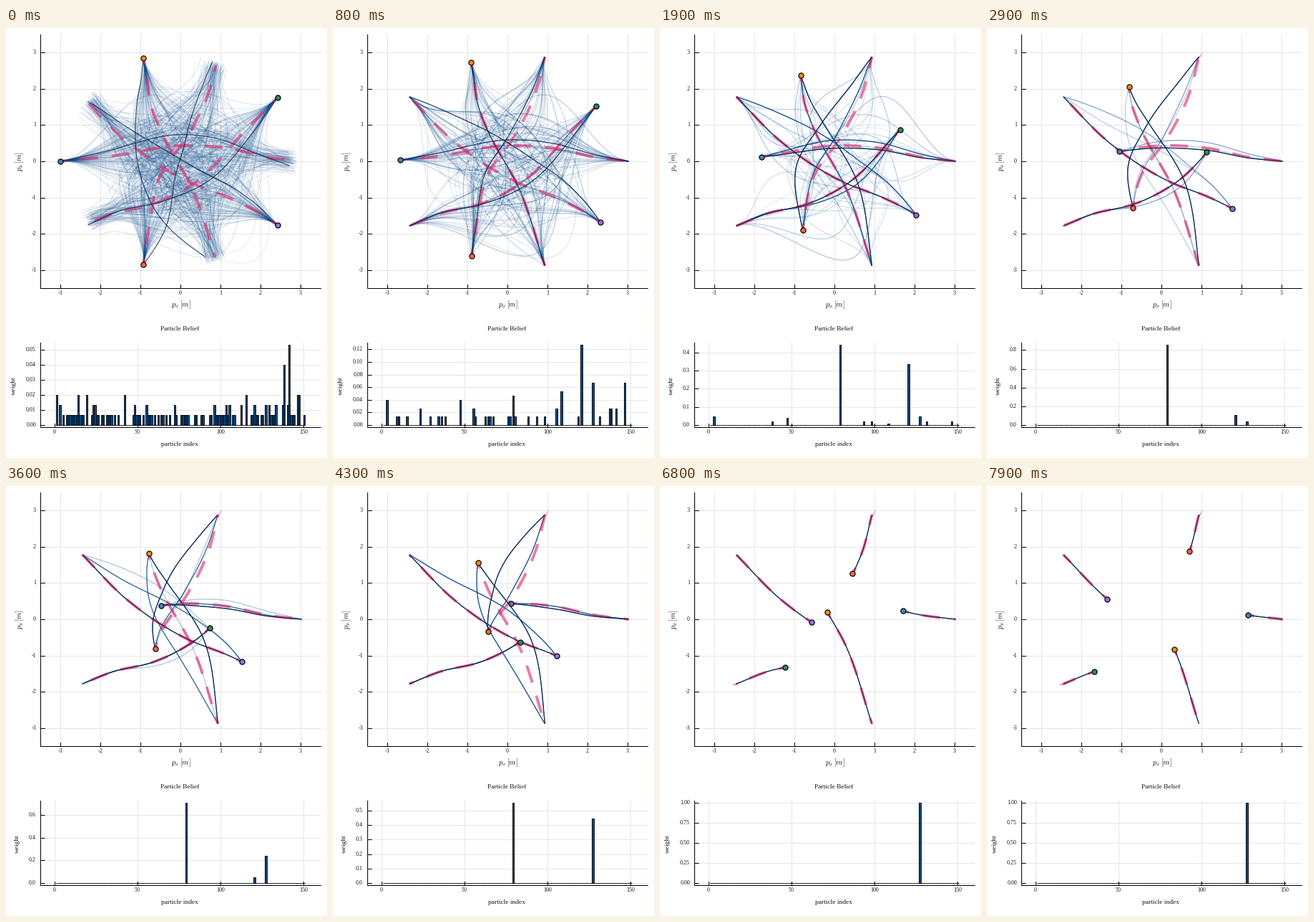
Write a matplotlib script that moves like this. It is 449 px wide and 600 px high and loops after 8000 ms.

```python
import numpy as np
import matplotlib.pyplot as plt
from matplotlib.animation import FuncAnimation
from matplotlib.collections import LineCollection, PolyCollection
from matplotlib.colors import to_rgb
from matplotlib.patches import Polygon

W, H, DPI = 449, 600, 64
FRAMES, INTERVAL = 80, 100
N = 150
PT = 72 / DPI  # points per pixel
NAVY, PINK = "#0a4a8c", (0.86, 0.15, 0.42, 0.6)

plt.rcParams.update({"font.family": "Liberation Serif", "mathtext.fontset": "cm"})


def polar(deg, r):
    """Pixel position of a point given in polar plot coordinates."""
    a = np.radians(deg)
    return np.array([244 + 56 * r * np.cos(a), 186 - 50.6 * r * np.sin(a)])


def spline(x, y, q, rest=False):
    """Cubic Hermite curve through (x, y); rest starts it with zero slope."""
    m = np.gradient(y, x)
    if rest:
        m[0] = 0
    k = np.clip(np.searchsorted(x, q, "right") - 1, 0, len(x) - 2)
    h = x[k + 1] - x[k]
    u = (q - x[k]) / h
    return ((1 + 2 * u) * (1 - u) ** 2 * y[k] + u * (1 - u) ** 2 * h * m[k]
            + u * u * (3 - 2 * u) * y[k + 1] + u * u * (u - 1) * h * m[k + 1])


def bends(s):
    """Two plain sines, then two bumps that leave and arrive smoothly."""
    p = np.pi * s
    bump = np.sin(p) ** 2
    return np.array([np.sin(p), np.sin(2 * p), bump, bump * np.cos(p)])


class Agent:
    """Crosses the circle; its route is a sideways offset from the diameter."""
    times = np.array([0, 19, 43, 58, 79, 105], float)

    def __init__(self, color, angle, *stops):
        self.color = color
        self.start = polar(angle, 3)
        goal = polar(angle + 180, 3.03)
        d = goal - self.start
        self.length = np.hypot(*d)
        self.e = d / self.length
        self.n = np.array([-self.e[1], self.e[0]])
        self.a, self.b = self.project([self.start, *stops, goal])

    def project(self, pts):
        p = np.array(pts, float) - self.start
        return p @ self.e, p @ self.n

    def place(self, a, b):
        return self.start + a[..., None] * self.e + b[..., None] * self.n

    def side(self, a):
        return spline(self.a, self.b, a)

    def progress(self, t):
        return spline(self.times, self.a, t, rest=True)

    def fit(self, t, pts):
        """Sine weights of a detour through pts, planned at time t."""
        a, b = self.project(pts)
        a0 = self.progress(t)
        s = (a - a0) / (self.length - a0)
        return np.linalg.lstsq(bends(s)[:2].T, b - self.side(a), rcond=None)[0]


AGENTS = [
    Agent("steelblue", 180, (142, 179.5), (248.5, 164), (310.5, 168), (365, 180)),
    Agent("seagreen", 36, (336, 141.5), (261.5, 217.5), (205, 246), (150, 259)),
    Agent("darkorange", 108, (196.5, 66), (202.5, 106.5), (213, 135.5), (262, 227.5)),
    Agent("tomato", 252, (199.5, 282), (217, 203), (252, 153.5), (283, 91.5)),
    Agent("mediumpurple", 324, (358, 260.5), (312.5, 237), (255.5, 214.5), (168, 157.5)),
]
BLUE, GREEN, ORANGE, RED, PURPLE = range(5)

# Strong particles: index -> (time planned, key points of each detour)
LATE = 127
DETOURS = {
    79: (29, {BLUE: [(290, 169)],
              ORANGE: [(247, 163), (284, 240)],
              RED: [(207, 165), (262, 83)]}),
    120: (29, {BLUE: [(280, 157), (360, 174)],
               GREEN: [(245, 237), (160, 256)],
               ORANGE: [],
               RED: [(215, 205), (268, 108)],
               PURPLE: [(280, 190), (190, 128)]}),
    LATE: (43, {ORANGE: [(213, 190), (262, 273)],
                RED: [(262, 125)],
                PURPLE: [(250, 177), (150, 122)]}),
    141: (0, {BLUE: [(240, 148), (330, 158)],
              GREEN: [(308, 190), (200, 247)],
              ORANGE: [(184, 140), (200, 228)],
              RED: [(235, 225), (262, 125)],
              PURPLE: [(240, 180), (155, 128)]}),
}

rng = np.random.default_rng(4)
COEF = rng.normal(size=(len(AGENTS), N + 1, 4)) * [0, 0, 34, 40]
FAN = rng.normal(0, 8, (len(AGENTS), N + 1, 1))
CUT = rng.uniform(0.02, 0.06, (len(AGENTS), N + 1, 1))
for i, (t0, routes) in DETOURS.items():
    COEF[:, i] = 0
    for j, pts in routes.items():
        if pts:
            COEF[j, i, :2] = AGENTS[j].fit(t0, pts)

# Strong particles hold keyed shares of 150; the others die out at random
SHARE_TIMES = [0, 8, 19, 29, 43, 54]
SHARES = {
    3: [2, 6, 7], 47: [1, 6, 6], 79: [1, 7, 66, 128, 83], 108: [1, 8, 1],
    120: [2, 19, 50, 16], LATE: [2, 10, 7, 6, 67, 150],
    138: [6, 4], 141: [8, 4], 146: [3, 10, 3],
}
BORN = rng.choice([0, 1, 2, 3], N + 1, p=[0.36, 0.5, 0.11, 0.03])
LIFE = rng.exponential(6, N + 1) + 0.5


def weights(t):
    count = np.where(t < LIFE, np.rint(BORN * (1 + t / 10)), 0)
    count[0] = 0
    for i, keys in SHARES.items():
        keys = keys + [0] * (len(SHARE_TIMES) - len(keys))
        count[i] = np.rint(np.interp(t, SHARE_TIMES, keys))
    return count / N


def tick_step(top):
    mag = 10 ** np.floor(np.log10(top) + 1e-9)
    if top / mag < 1.03:
        return mag / 4
    return min((mag * c for c in (0.1, 0.2, 0.5, 1, 2)),
               key=lambda c: abs(int(top / c + 1e-9) - 4))


# Stage
fig = plt.figure(figsize=(W / DPI, H / DPI), dpi=DPI, facecolor="white")
ax = fig.add_axes([0, 0, 1, 1])
ax.set_xlim(0, W)
ax.set_ylim(H, 0)
ax.axis("off")

LEFT, RIGHT = 48, 440
ZERO, PEAK = 554, 442.4
GRID = dict(color="#e4e4e4", lw=0.9 * PT, zorder=0)
AXIS = dict(color="black", lw=1.0 * PT, zorder=1)


def text(x, y, s, size=9.4, **kw):
    kw = {"ha": "center", "va": "center"} | kw
    return ax.text(x, y, s, fontsize=size * PT, color="#111111", **kw)


def frame(top, bottom, xticks):
    for x, label in xticks:
        ax.plot([x, x], [top, bottom], **GRID)
        ax.plot([x, x], [bottom, bottom - 5], **AXIS)
        text(x, bottom + 6.5, label, 8)
    ax.plot([LEFT, LEFT, RIGHT], [top, bottom, bottom], **AXIS)


def bin_x(i):
    return 67.5 + 2.3227 * i


frame(9, 363, [(244 + 56 * v, str(v)) for v in range(-3, 4)])
for v in range(-3, 4):
    y = 186 - 50.6 * v
    ax.plot([LEFT, RIGHT], [y, y], **GRID)
    ax.plot([LEFT, LEFT + 6], [y, y], **AXIS)
    text(42, y, str(v), 8, ha="right")
frame(439, 557, [(bin_x(v), str(v)) for v in (0, 50, 100, 150)])

text(244.5, 386, r"$p_x\,[m]$", 10.5)
text(19, 186, r"$p_y\,[m]$", 10.5, rotation=90)
text(243, 420.5, "Particle Belief")
text(243, 581, "particle index")
ylabel = text(11, 499, "weight", rotation=90)

grid = ax.add_collection(LineCollection([], colors=GRID["color"], linewidths=GRID["lw"], zorder=0))
marks = ax.add_collection(LineCollection([], colors="black", linewidths=AXIS["lw"], zorder=1))
ylabels = [text(42, 0, "", 8, ha="right") for _ in range(10)]
bars = ax.add_collection(PolyCollection([], facecolors=NAVY, edgecolors="black",
                                        linewidths=0.9 * PT, zorder=3))

fans = ax.add_collection(LineCollection([], linewidths=1.3 * PT, zorder=2))
dashes = [ax.plot([], [], color=PINK, lw=4 * PT, ls=(4, (6.25, 4.75)), zorder=3)[0]
          for _ in AGENTS]
best = ax.add_collection(LineCollection([], colors=[(0, 0.05, 0.15, 0.65)],
                                        linewidths=1.0 * PT, zorder=4))
dots = [ax.plot([], [], "o", ms=7.2 * PT, mfc=a.color, mec="black", mew=1.2 * PT, zorder=5)[0]
        for a in AGENTS]


def spike(since, *corners):
    patch = Polygon(corners, facecolor=PINK, lw=0, zorder=3)
    return since, ax.add_patch(patch)


spikes = [spike(28, (294, 44), (297.5, 42), (303, 32)),
          spike(55, (111, 273), (109, 277.5), (100, 278))]

S = np.linspace(0, 1, 45)
BENDS = bends(S)


def draw_histogram(w):
    top = w.max()
    scale = (ZERO - PEAK) / top
    step = tick_step(top)
    digits = next(d for d in range(1, 5) if abs(round(step, d) - step) < 1e-9)
    values = np.arange(int(top / step + 1e-9) + 1) * step
    ys = ZERO - values * scale
    grid.set_segments([[(LEFT, y), (RIGHT, y)] for y in ys])
    marks.set_segments([[(LEFT, y), (LEFT + 6, y)] for y in ys])
    for k, label in enumerate(ylabels):
        shown = k < len(values)
        label.set_visible(shown)
        if shown:
            label.set_y(ys[k])
            label.set_text(f"{values[k]:.{digits}f}")
    ylabel.set_x(20.5 - 4.7 * digits)
    bars.set_verts([[(bin_x(i), ZERO), (bin_x(i), ZERO - w[i] * scale),
                     (bin_x(i + 1), ZERO - w[i] * scale), (bin_x(i + 1), ZERO)]
                    for i in range(1, N + 1)])


def update(t):
    w = weights(t)
    draw_histogram(w)
    live = np.flatnonzero(w)
    live = live[np.argsort(w[live], kind="stable")]
    loose = np.exp(-t / 2)  # plans do not reach the goals at first
    coef = COEF.copy()
    coef[:, LATE] *= np.interp(t, [46, 55], [1, 0])

    lines, leaders = [], []
    for j, agent in enumerate(AGENTS):
        a0 = agent.progress(t)
        rest = agent.length - a0
        a = a0 + rest * S
        b = agent.side(a)
        dots[j].set_data(*agent.place(a[:1], b[:1]).T)
        end = a0 + rest * S * (1 - 0.04 * loose)
        dashes[j].set_data(*agent.place(end, agent.side(end)).T)
        along = a - rest * S * CUT[j, live] * loose
        across = b + coef[j, live] @ BENDS + FAN[j, live] * S ** 2 * loose
        paths = agent.place(along, across)
        lines.extend(paths)
        leaders.append(paths[-1])

    alpha = np.minimum(1, 2.2 * w[live] ** 0.66)
    fans.set_segments(lines)
    fans.set_color([(*to_rgb(NAVY), k) for k in alpha] * len(AGENTS))
    best.set_segments(leaders)
    for since, patch in spikes:
        patch.set_visible(t >= since)
    return []


anim = FuncAnimation(fig, update, frames=FRAMES, interval=INTERVAL,
                     repeat=True, repeat_delay=0, blit=False)
plt.show()
```
